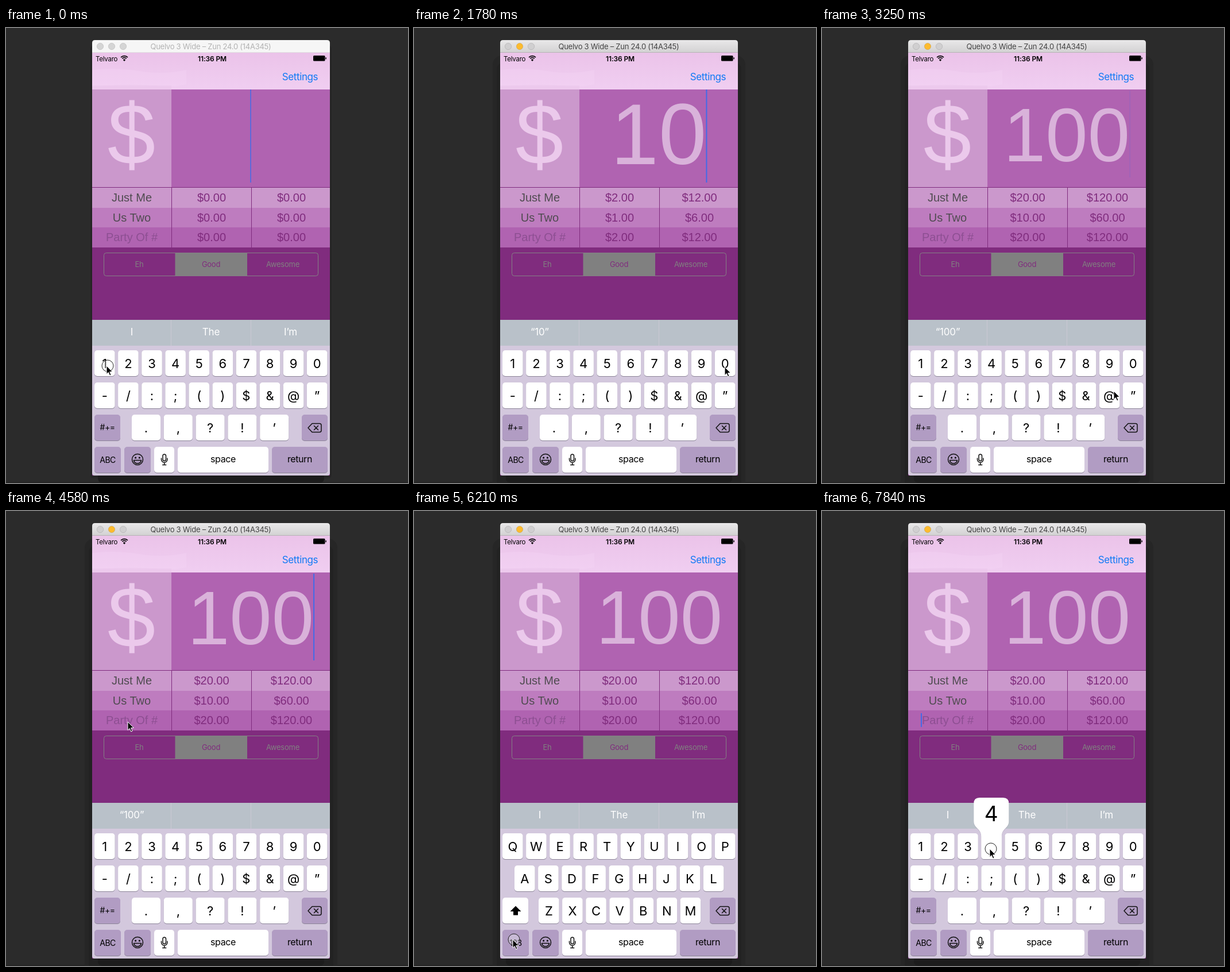
These frames come from a looping animation (700x792 px, 7990 ms). An HTML page:

```html
<!DOCTYPE html>
<html lang="en">
<head>
<meta charset="utf-8">
<title>Tip calculator</title>
<style>
  html, body { margin: 0; width: 100%; height: 100%; overflow: hidden; background: #2b2b2b; }
  svg { display: block; width: 700px; height: 792px; }
  text { font-family: Inter, sans-serif; text-anchor: middle; white-space: pre; }
  .cell, .big { font-family: "Liberation Sans", Arial, sans-serif; }
  .cell { font-size: 20px; fill: #802c7e; }
  .big { font-size: 150px; }
  .seg { font-size: 13px; letter-spacing: -.25px; fill: #808080; }
  .hint { font-size: 17px; letter-spacing: -.2px; fill: #fff; }
  .key { font-size: 22px; }
  .word { font-size: 16px; letter-spacing: -.4px; }
  .small { font-size: 14px; letter-spacing: -.5px; }
  .line { fill: none; stroke: #111; stroke-width: 1.5; stroke-linecap: round; stroke-linejoin: round; }
  .caret { fill: #426be8; }
</style>
</head>
<body>
<svg id="stage" viewBox="0 0 700 792"></svg>
<script>
const LOOP = 7990, STEP = 147.9;
const PLUM = '#802c7e', KEY = '#fff', DARK_KEY = '#b19cc3';
const PITCH = 41.1, KEY_W = 35.6, KEY_H = 45;

const rect = (x, y, w, h, fill, extra = '') =>
  `<rect x="${x}" y="${y}" width="${w}" height="${h}" fill="${fill}" ${extra}/>`;
const text = (x, y, s, cls, extra = '') =>
  `<text x="${x}" y="${y}" class="${cls}" ${extra}>${s.replace(/&/g, '&amp;')}</text>`;
const group = (id, body) => `<g id="${id}">${body}</g>`;
const $ = id => document.getElementById(id);

function key(x, row, w, label = '', fill = KEY, cls = 'key', drop = 8) {
  const y = 561 + row * 56;
  return rect(x, y + 1, w, KEY_H, '#8d8599', 'rx="5"') + rect(x, y, w, KEY_H, fill, 'rx="5"') +
    text(x + w / 2, y + 23 + drop, label, cls);
}
const keyRow = (chars, x, row, pitch = PITCH, w = KEY_W) =>
  [...chars].map((c, i) => key(x + i * pitch, row, w, c)).join('');

function shadows() {
  return rect(0, 790, 700, 2, '#242424') +
    group('softShade', rect(147, 30, 420, 754, '#252525', 'rx="6"')) +
    group('deepShade', rect(137, 48, 440, 760, '#262626', 'rx="16"') +
      rect(144, 60, 426, 740, '#222', 'rx="12"')) +
    rect(160, 770, 394, 22, '#1c1c1c', 'rx="8"');
}

function titleBar(id, fill, ink, dots, edge) {
  return group(id, `<path d="M150 43V26q0-5 5-5H559q5 0 5 5V43z" fill="${fill}"/>` +
    rect(150, 42, 414, 1, edge) +
    dots.map((c, i) => `<circle cx="${164 + i * 20}" cy="32" r="5.7" fill="${c}" stroke="#000" stroke-opacity=".15" stroke-width=".8"/>`).join('') +
    text(356.5, 37, 'Quelvo 3 Wide – Zun 24.0 (14A345)', '', `font-size="13" letter-spacing="-.25" fill="${ink}"`));
}

function header() {
  const arc = r => `<path d="M${206 - r * .72} ${57 - r * .72}A${r} ${r} 0 0 1 ${206 + r * .72} ${57 - r * .72}" fill="none" stroke="#000" stroke-width="1.7"/>`;
  return rect(150, 43, 414, 64, 'url(#navFill)') +
    '<path d="M150 73q40-5 82 2t82-2V98q-22 6-60 2t-104 2z" fill="#f2d4f2" opacity=".35"/>' +
    rect(150, 100, 138, 7, '#e6bfe6', 'opacity=".35"') +
    text(156, 58, 'Telvaro', '', 'font-size="11.5" letter-spacing="-.25" style="text-anchor:start"') +
    arc(8.2) + arc(5.2) + '<path d="M206 58l-2.2-2.7a3.2 3.2 0 0 1 4.4 0z"/>' +
    text(359, 58, '11:36 PM', '', 'font-size="12" font-weight="600" letter-spacing="-.15"') +
    rect(535, 48, 20.5, 9.5, '#000', 'rx="1.5"') + rect(556.3, 51, 1.5, 3.5, '#000', 'rx=".7"') +
    text(512, 91, 'Settings', '', 'font-size="17" letter-spacing="-.4" fill="#117af5"');
}

function table() {
  const names = ['Just Me', 'Us Two', 'Party Of #'];
  const fills = ['#cb98cc', '#be7cbf', '#b063b1'];
  const edges = [278, 313, 347, 382];
  let out = rect(150, 107, 414, 672, PLUM) + rect(150, 107, 138, 170, '#cb98cc') +
    rect(288, 107, 276, 170, '#b063b1') + text(218.5, 237, '$', 'big', 'fill="#ebc9eb"');
  names.forEach((name, i) => {
    const y = [302, 337, 371][i];
    out += rect(150, edges[i], 414, edges[i + 1] - edges[i], fills[i]) +
      text(219, y, name, 'cell', `style="fill:${i < 2 ? '#4f4b50' : '#8d4f92'}"`) +
      text(358, y, '', 'cell', `id="tip${i}"`) + text(497, y, '', 'cell', `id="sum${i}"`);
  });
  return out + rect(288, 278, 1, 104, PLUM) + rect(427, 278, 1, 104, PLUM) +
    text(426, 237, '', 'big', 'id="bill" fill="#d9b2da"') +
    rect(0, 107, 2, 162, '', 'id="billCaret" class="caret"') +
    rect(172, 352, 2, 24, '', 'id="partyCaret" class="caret"');
}

function segments() {
  return rect(294.5, 391.5, 125.5, 40, '#808080') +
    rect(170.5, 391.5, 373, 40, 'none', 'rx="4" stroke="#858085"') +
    text(232, 416, 'Eh', 'seg') + text(357, 416, 'Good', 'seg', `style="fill:${PLUM}"`) +
    text(482, 416, 'Awesome', 'seg');
}

function keyboard() {
  const deleteIcon = '<path class="line" d="M526 696L533 688.5H546q3 0 3 3V700.500q0 3-3 3H533zM536.5 692.500l7 7m0-7l-7 7"/>';
  const smile = '<circle class="line" cx="229" cy="751" r="9.500"/><circle cx="225.600" cy="748" r="1.500"/><circle cx="232.400" cy="748" r="1.500"/><path class="line" d="M222.500 752.500h13q-1 5.500-6.500 5.500t-6.500-5.500z"/>';
  const mic = '<rect class="line" x="273" y="742" width="5.500" height="11.500" rx="2.750"/><path class="line" d="M270.500 749v2a5.200 5.200 0 0 0 10.400 0v-2M275.700 756.500v4m-3 0h6"/>';
  const shift = '<path d="M177 687.500l9.500 9.500h-5.500v6.500h-8v-6.500h-5.500z"/>';
  return rect(150, 508, 414, 45, '#b9c1c9') + rect(287, 508, 1, 45, '#cac8d3') + rect(426, 508, 1, 45, '#cac8d3') +
    [219, 357, 495.5].map((x, i) => text(x, 535, '', 'hint', `id="hint${i}"`)).join('') +
    '<path d="M150 553H564V775q0 4-4 4H154q-4 0-4-4z" fill="#d3c8dd"/>' +
    key(515, 2, 45, '', DARK_KEY) + deleteIcon +
    key(206, 3, 46, '', DARK_KEY) + smile + key(258, 3, 35, '') + mic +
    key(299, 3, 158, 'space', KEY, 'word', 4) + key(463, 3, 97, 'return', DARK_KEY, 'word', 4) +
    group('digits', keyRow('1234567890', 154, 0) + keyRow('-/:;()$&@”', 154, 1) +
      key(154, 2, 45, '#+=', DARK_KEY, 'small', 4) + keyRow('.,?!’', 219, 2, 55.8, 50) +
      key(154, 3, 46, 'ABC', DARK_KEY, 'small', 5)) +
    group('letters', keyRow('QWERTYUIOP', 154, 0) + keyRow('ASDFGHJKL', 175, 1) +
      key(154, 2, 45) + shift + keyRow('ZXCVBNM', 217, 2) +
      key(154, 3, 46, '123', DARK_KEY, 'small', 5));
}

// Enlarged bubble above a pressed number key
function bubble(digit) {
  const i = '1234567890'.indexOf(digit);
  const a = 154 + i * PITCH, b = a + KEY_W;
  const l = Math.max(153, Math.min(a - 13, 500)), r = l + 61;
  const d = `M${l + 10} 499H${r - 10}q10 0 10 10V540C${r} 553 ${b} 552 ${b} 567V601q0 5-5 5H${a + 5}q-5 0-5-5V567C${a} 552 ${l} 553 ${l} 540V509q0-10 10-10z`;
  return `<path d="${d}" fill="#8d8599" opacity=".45" transform="translate(0 1)"/><path d="${d}" fill="#fff"/>` +
    text((l + r) / 2, 540, digit, '', 'font-size="37"');
}

$('stage').innerHTML =
  `<defs>
    <linearGradient id="navFill" x2="0" y2="1"><stop stop-color="#ebc3e9"/><stop offset="1" stop-color="#f0cef1"/></linearGradient>
    <linearGradient id="barFill" x2="0" y2="1"><stop stop-color="#e9e8e9"/><stop offset="1" stop-color="#d2d1d2"/></linearGradient>
  </defs>` +
  rect(0, 0, 700, 792, '#2b2b2b') + shadows() +
  titleBar('idleBar', '#f6f6f6', '#b2b2b2', Array(3).fill('#d5d5d5'), '#e0e0e0') +
  titleBar('activeBar', 'url(#barFill)', '#434343', ['#d0cfd0', '#fdbb2e', '#d0cfd0'], '#b5b4b5') +
  table() + header() + segments() + keyboard() + group('popup', '') +
  '<circle id="touch" r="10" fill="#fff" fill-opacity=".3" stroke="#222"/>' +
  '<path id="pointer" d="M0 0V14.500L3.300 11.400 5.700 17 8 16 5.700 10.500H10.300z" stroke="#fff" stroke-width="1"/>';

// Pointer waypoints: step, x, y
const PATH = [
  [0, 175, 588], [2, 180, 589], [3, 290, 592], [4, 431, 590], [6, 541, 590], [17, 541, 590],
  [20, 530, 671], [22, 508, 632], [24, 430, 553], [29, 218, 375], [31, 212, 367], [35, 212, 367],
  [38, 198, 540], [40, 176, 735], [41, 172, 746], [43, 172, 746], [45, 187, 712],
  [48, 258, 594], [51, 292, 588], [54, 292, 588]
];
const BILLS = [[0, ''], [2, '1'], [10, '10'], [16, '100']];
const HINTS = [[0, 'I,The,I’m'], [3, '“1”,,'], [11, '“10”,,'], [17, '“100”,,'], [37, 'I,The,I’m']];
const POPUPS = [[0, ''], [1, '1'], [2, ''], [8, '0'], [10, ''], [14, '0'], [16, ''], [53, '4']];
const TOUCHES = [[0, 1], [2, 0], [8, 1], [9, 0], [14, 1], [15, 0], [33, 1], [35, 0], [42, 1], [43, 0], [53, 1]];
const FOCUS = 37, DIGITS_BACK = 43;

const latest = (list, k) => list.filter(e => e[0] <= k).pop();
const clamp = v => Math.max(0, Math.min(1, v));
const show = (id, on) => $(id).style.display = on ? '' : 'none';

function blink(steps) {
  const p = steps * STEP / 1000 % 1;
  return p < .7 ? clamp((.65 - p) / .1) : clamp((p - .875) / .1);
}

function pointerAt(k) {
  const a = latest(PATH, k), b = PATH[PATH.indexOf(a) + 1] || a;
  const f = a === b ? 0 : (k - a[0]) / (b[0] - a[0]);
  return [a[1] + (b[1] - a[1]) * f, a[2] + (b[2] - a[2]) * f];
}

function draw(k) {
  const active = k > 0, letters = k >= FOCUS && k < DIGITS_BACK;
  show('idleBar', !active); show('activeBar', active);
  show('softShade', !active); show('deepShade', active);
  show('digits', !letters); show('letters', letters);

  const [typedAt, bill] = latest(BILLS, k);
  const size = bill.length > 2 ? 132 : 150, editing = k < FOCUS;
  $('bill').textContent = bill;
  $('bill').style.fontSize = size + 'px';
  $('bill').setAttribute('x', editing ? 426 : 427);
  $('bill').setAttribute('y', size === 150 ? 237 : editing ? 232 : 231);
  const caret = $('billCaret');
  caret.setAttribute('x', 425 + bill.length * size * .278);
  caret.setAttribute('y', size === 150 ? 107 : 109);
  caret.setAttribute('height', size === 150 ? 162 : 151);
  caret.style.opacity = editing ? blink(k - typedAt) * (bill ? 1 : .75) : 0;
  $('partyCaret').style.opacity = editing ? 0 : blink(k - FOCUS);

  [1, 2, 1].forEach((people, i) => {
    $('tip' + i).textContent = '$' + (bill * .2 / people).toFixed(2);
    $('sum' + i).textContent = '$' + (bill * 1.2 / people).toFixed(2);
  });
  latest(HINTS, k)[1].split(',').forEach((s, i) => $('hint' + i).textContent = s);

  const digit = latest(POPUPS, k)[1];
  $('popup').innerHTML = digit && bubble(digit);
  const [x, y] = pointerAt(k);
  $('pointer').setAttribute('transform', `translate(${x} ${y})`);
  $('touch').setAttribute('transform', `translate(${x + 2} ${y})`);
  show('touch', latest(TOUCHES, k)[1]);
}

let shown = -1;
function tick() {
  const k = Math.min(53, Math.floor((performance.now() % LOOP + 10) / STEP));
  if (k !== shown) draw(shown = k);
  requestAnimationFrame(tick);
}
tick();
</script>
</body>
</html>
```
